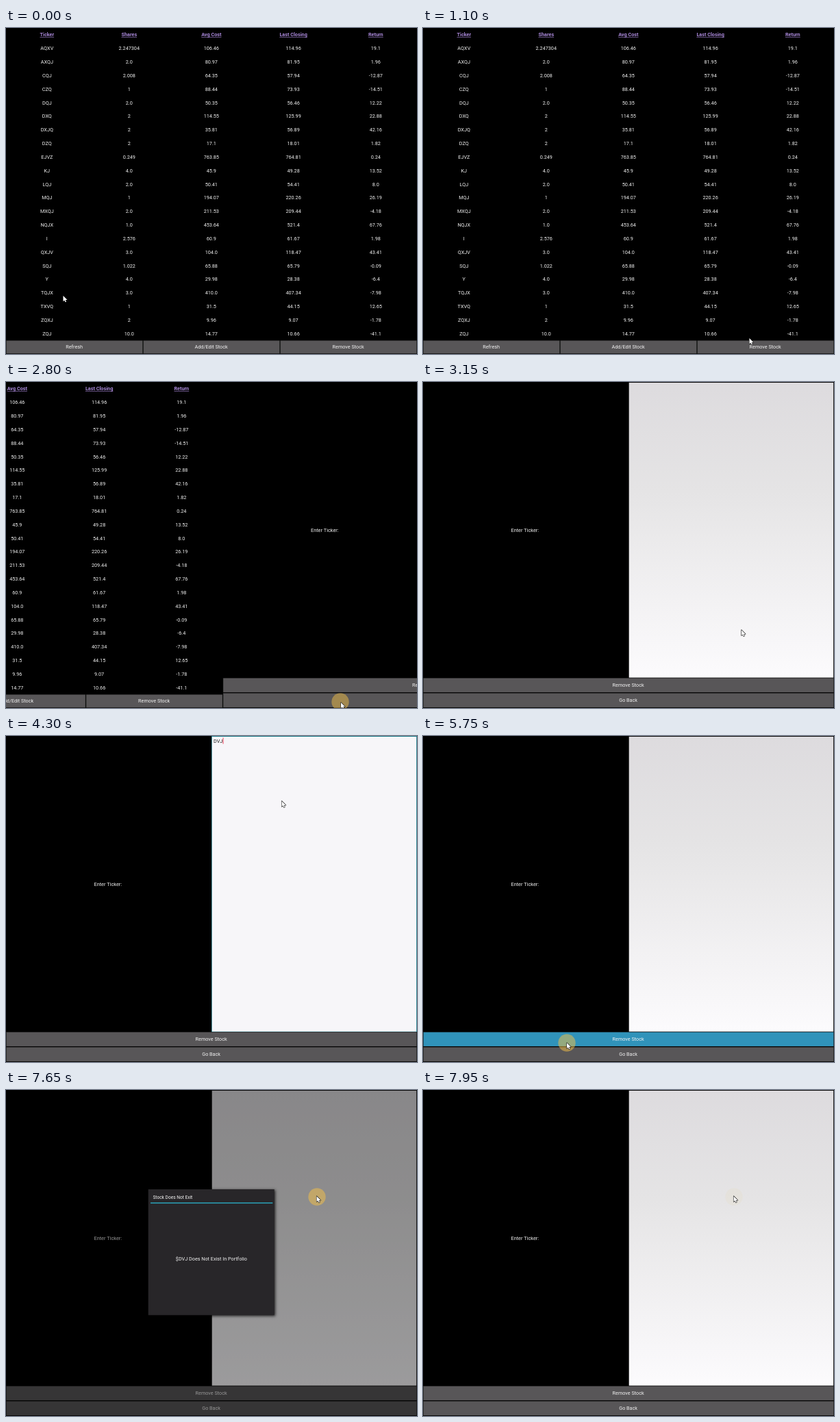
Recreate the animation shown at these times as an HTML page with a canvas. Size 600 px wide and 476 px high, loop 8 s.

```html
<!DOCTYPE html>
<html lang="en">
<head>
<meta charset="utf-8">
<title>Portfolio</title>
<style>
  html, body { margin: 0; width: 100%; height: 100%; overflow: hidden; background: #000; }
  canvas { display: block; width: 600px; height: 476px; }
</style>
</head>
<body>
<canvas id="stage"></canvas>
<script>
const W = 600, H = 476, LOOP = 8000, STEP = 50;
const canvas = document.getElementById('stage');
const ctx = canvas.getContext('2d');
const ratio = window.devicePixelRatio || 1;
canvas.width = W * ratio;
canvas.height = H * ratio;

const GREY = '#585658', BLUE = '#3093ba', TEAL = '#2aa3b8';
const COLUMNS = [59.8, 179.8, 299.8, 419.6, 539.8];
const HEADERS = ['Ticker', 'Shares', 'Avg Cost', 'Last Closing', 'Return'];
const ROWS = `AQXV 2.247304 106.46 114.96 19.1
AXQJ 2.0 80.97 81.95 1.96
CQJ 2.008 64.35 57.94 -12.87
CZQ 1 88.44 73.93 -14.51
DQJ 2.0 50.35 56.46 12.22
DXQ 2 114.55 125.99 22.88
DXJQ 2 35.81 56.89 42.16
DZQ 2 17.1 18.01 1.82
EJVZ 0.249 763.85 764.81 0.24
KJ 4.0 45.9 49.28 13.52
LQJ 2.0 50.41 54.41 8.0
MQJ 1 194.07 220.26 26.19
MXQJ 2.0 211.53 209.44 -4.18
NQJX 1.0 453.64 521.4 67.76
I 2.576 60.9 61.67 1.98
QXJV 3.0 104.0 118.47 43.41
SQJ 1.022 65.88 65.79 -0.09
Y 4.0 29.98 28.38 -6.4
TQJX 3.0 410.0 407.34 -7.98
TXVQ 1 31.5 44.15 12.65
ZQXJ 2 9.96 9.07 -1.78
ZQJ 10.0 14.77 10.66 -41.1`.split('\n').map(row => row.split(' '));

const TYPED = 'DVJ';
const KEYS = [3900, 4050, 4200];
const FOCUS = 3420, REMOVE = 5740;
const SLIDE = [2611, 3011], OPEN = [5860, 5960], CLOSE = [7605, 7705];

// time, x, y of the pointer tip
const PATH = [
  [0, 83.5, 391], [100, 83.5, 391], [350, 24, 400], [500, 28, 402],
  [700, 180, 412], [900, 390, 426], [1100, 476.5, 453], [1300, 489, 468],
  [3050, 489, 468], [3400, 404.5, 97], [4000, 404.5, 97], [4250, 402.5, 95],
  [4500, 402.5, 95], [5150, 301, 426], [5500, 210, 448], [6080, 210, 448],
  [6350, 339, 246], [6550, 411, 223], [6900, 411, 223], [7350, 453.5, 155], [LOOP, 453.5, 155]
];
const CLICKS = [[2490, 488, 467], [FOCUS, 404.5, 98], [REMOVE, 210, 448], [7490, 454, 156]];

const clamp = v => Math.max(0, Math.min(1, v));
const progress = (t, [from, to]) => clamp((t - from) / (to - from));
const within = (t, from, to) => t >= from && t < to;

function text(str, x, y, { size = 7.25, color = '#f2f2f2', align = 'center', weight = 400 } = {}) {
  ctx.font = `${weight} ${size}px Roboto, sans-serif`;
  ctx.textAlign = align;
  ctx.fillStyle = color;
  ctx.fillText(str, x, y + size * 0.356);
  return ctx.measureText(str).width;
}

function rect(x, y, w, h, color) {
  ctx.fillStyle = color;
  ctx.fillRect(x, y, w, h);
}

function button(label, x, y, w, h, pressed) {
  rect(x, y, w, h, '#111');
  rect(x + 0.7, y + 0.5, w - 1.4, h - 1, pressed ? BLUE : GREY);
  text(label, x + w / 2 - 0.4, y + h / 2);
}

function drawTable(t) {
  const rowY = i => 9.9 + i * 19.83;
  HEADERS.forEach((label, i) => {
    const color = '#aa89da';
    const width = text(label, COLUMNS[i], rowY(0), { weight: 700, color });
    rect(COLUMNS[i] - width / 2, rowY(0) + 3.2, width, 0.6, color);
  });
  ROWS.forEach((row, r) => row.forEach((cell, i) => text(cell, COLUMNS[i], rowY(r + 1))));
  ['Refresh', 'Add/Edit Stock', 'Remove Stock'].forEach((label, i) =>
    button(label, i * 200, 456, 200, 19.7, i === 2 && within(t, 2490, 2600)));
}

function drawInput(t) {
  const focused = within(t, FOCUS, REMOVE);
  rect(300, 0, 300, 432.3, focused ? '#167686' : '#080808');
  let fill = '#f7f6f9';
  if (!focused) {
    fill = ctx.createLinearGradient(0, 0, 0, 432);
    fill.addColorStop(0, '#dddbde');
    fill.addColorStop(0.37, '#e5e4e5');
    fill.addColorStop(1, '#fcfbfd');
  }
  rect(300.7, 1, 298.4, 430.6, fill);
  if (!focused) return;
  const count = KEYS.filter(key => t >= key).length;
  const width = text(TYPED.slice(0, count), 303, 7, { color: '#222', align: 'left' });
  const lastKey = count ? KEYS[count - 1] : FOCUS;
  if ((t - lastKey) % 1000 < 500) rect(303.2 + width, 2.5, 1, 9, '#f0405a');
}

function drawForm(t) {
  text('Enter Ticker:', 148.8, 216, { size: 7.35 });
  drawInput(t);
  button('Remove Stock', 0, 432, W, 21.5, within(t, REMOVE, 5850));
  button('Go Back', 0, 454, W, 21.5);
}

function drawPopup(t) {
  const shown = progress(t, OPEN) - progress(t, CLOSE);
  if (shown <= 0) return;
  rect(0, 0, W, H, `rgba(0, 0, 0, ${0.7 * shown})`);
  ctx.save();
  ctx.shadowColor = 'rgba(0, 0, 0, .8)';
  ctx.shadowBlur = 4 * ratio;
  ctx.shadowOffsetX = ctx.shadowOffsetY = ratio;
  rect(207.7, 145, 184, 183.7, '#282629');
  ctx.restore();
  text('Stock Does Not Exit', 214.4, 156.3, { size: 6.6, align: 'left' });
  rect(211, 164.2, 178.3, 1.5, TEAL);
  text(`$${TYPED} Does Not Exist In Portfolio`, 299.9, 246.4);
}

function drawClicks(t) {
  for (const [start, x, y] of CLICKS) {
    if (t < start || t > start + 500) continue;
    const fade = 1 - progress(t, [start + 300, start + 480]);
    ctx.fillStyle = `rgba(245, 192, 70, ${0.51 * fade})`;
    ctx.beginPath();
    ctx.arc(x, y, 12.7, 0, Math.PI * 2);
    ctx.fill();
  }
}

function drawPointer(t) {
  const next = PATH.findIndex(point => point[0] > t);
  const [a, b] = [PATH[next - 1], PATH[next]];
  const k = progress(t, [a[0], b[0]]);
  ctx.save();
  ctx.translate(a[1] + (b[1] - a[1]) * k, a[2] + (b[2] - a[2]) * k);
  const arrow = new Path2D('M0 0V8.2L1.9 6.5 3.1 9.3 4.5 8.7 3.3 6H5.9Z');
  ctx.lineWidth = 1.1;
  ctx.lineJoin = 'round';
  ctx.strokeStyle = '#111';
  ctx.stroke(arrow);
  ctx.fillStyle = '#fff';
  ctx.fill(arrow);
  ctx.restore();
}

function draw(now) {
  const t = Math.floor((now % LOOP) / STEP) * STEP;
  ctx.setTransform(ratio, 0, 0, ratio, 0, 0);
  rect(0, 0, W, H, '#000');
  const shift = W * progress(t, SLIDE);
  ctx.save();
  ctx.translate(-shift, 0);
  if (shift < W) drawTable(t);
  ctx.translate(W, 0);
  if (shift > 0) drawForm(t);
  ctx.restore();
  drawPopup(t);
  drawClicks(t);
  drawPointer(t);
}

const begin = performance.now();
function tick() {
  draw(Math.max(0, performance.now() - begin));
  requestAnimationFrame(tick);
}
tick();
</script>
</body>
</html>
```
